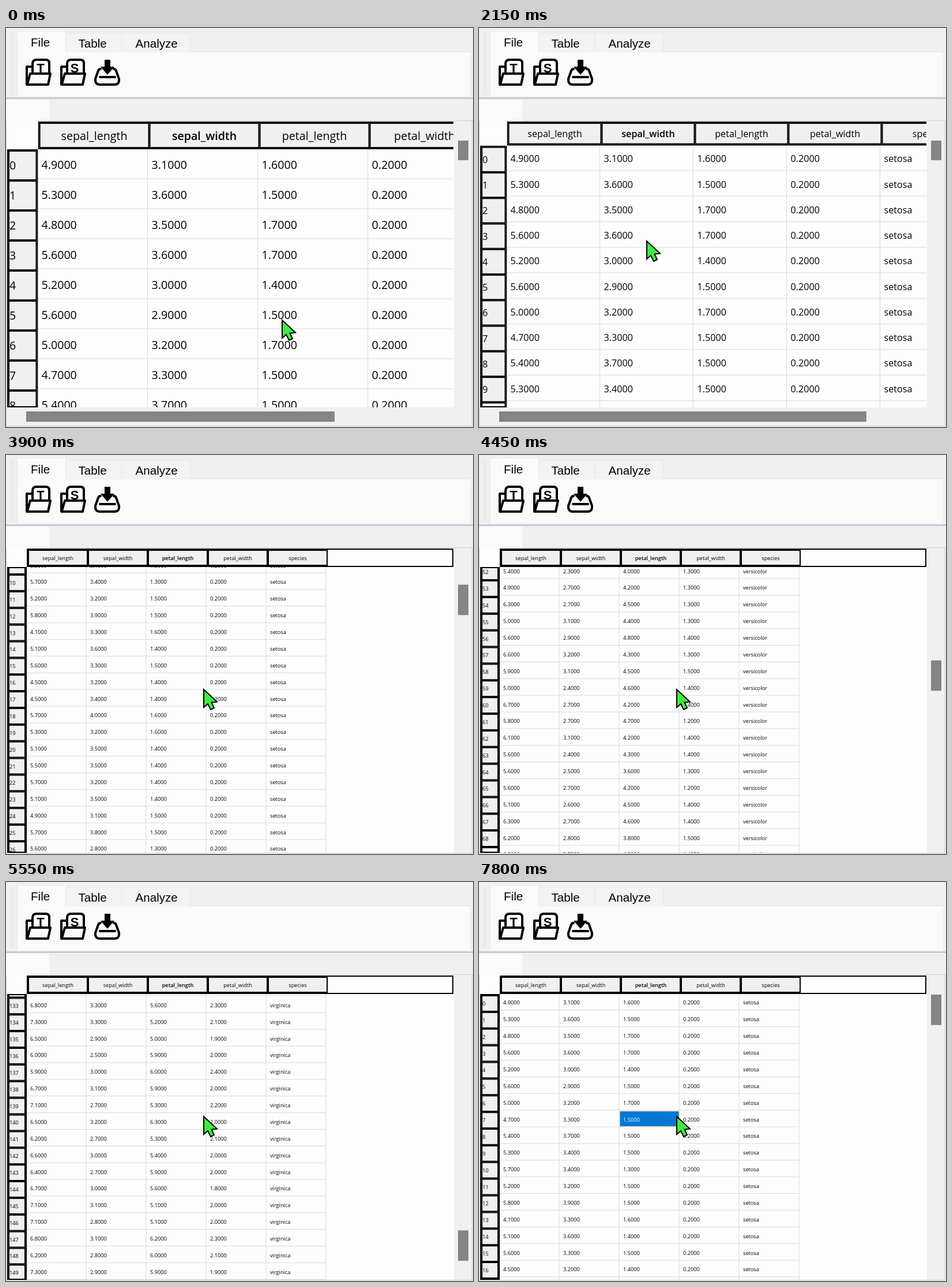
These frames come from a looping animation (810x691 px, 7850 ms). An HTML page:

```html
<!DOCTYPE html>
<html lang="en">
<head>
<meta charset="utf-8">
<title>Table viewer</title>
<style>
html, body { margin: 0; width: 100%; height: 100%; overflow: hidden; background: #f0f0f0; }
svg { display: block; }
.ui { font-family: "Liberation Sans", Arial, sans-serif; font-size: 20.6px; }
.data { font-family: "Open Sans", "Noto Sans", sans-serif; }
.icon { fill: none; stroke: #000; stroke-width: 4; stroke-linejoin: round; stroke-linecap: round; }
</style>
</head>
<body>
<svg width="810" height="691" viewBox="0 0 810 691">
  <defs>
    <g id="folder" class="icon">
      <path d="M46 76V62q0-7 7-7h16q6 0 6 6v15" fill="#fff"/>
      <path d="M45 67h-9v31h37l4-19H42l-5 18"/>
    </g>
  </defs>
  <rect width="810" height="691" fill="#f0f0f0"/>
  <path d="M8.500 8V115M11.500 10V115" stroke="#dcdce0" stroke-width="1.500" stroke-dasharray="2 2"/>
  <path d="M104 41V9H319V41M200.500 9V41M319 41H805" fill="#f3f3f3" stroke="#e5e5e8"/>
  <path d="M20 118V5H103V42H805V118Z" fill="#fafafa"/>
  <path d="M19.500 118V5.500H103.500V41" fill="none" stroke="#eaeaec"/>
  <g class="ui">
    <text x="43" y="31.500">File</text>
    <text x="125.500" y="33.500">Table</text>
    <text x="224.500" y="33.500">Analyze</text>
    <text x="24" y="151">iris</text>
  </g>
  <use href="#folder"/>
  <use href="#folder" x="60"/>
  <g font-family="Liberation Sans, Arial, sans-serif" font-size="22" font-weight="700" text-anchor="middle">
    <text x="60" y="77">T</text>
    <text x="119" y="77">S</text>
  </g>
  <path class="icon" d="M164 71q-3 0-4 3l-5 14q-1 10 8 10h25q9 0 8-10l-5-14q-1-3-4-3M163 85h26"/>
  <path d="M171 55h10v12h7l-12 14l-12-14h7Z"/>
  <path d="M0 121.500H810" stroke="#b8b8d0" stroke-width="2"/>
  <path d="M0 124H75V162H0Z" fill="#fafafa"/>
  <path d="M75 160.500H810" stroke="#cfcfcb"/>
  <g id="table" class="data"></g>
  <path d="M0 689.500H808.500V161M.5 161V690" fill="none" stroke="#c9c9c4"/>
  <path id="cursor" d="M0 0V31L7 25L12 35L18 32L13.500 22.500L23 21.500Z" fill="#40ec40" stroke="#000" stroke-width="2"/>
</svg>
<script>
const LOOP = 7850, STEP = 50, TOP = 162, RIGHT = 776, ROWS = 150;
const PAPER = "#fdfdfd", PANEL = "#f0f0f0", THUMB = "#858585";
const columns = ["sepal_length", "sepal_width", "petal_length", "petal_width", "species"];
const species = [
  { name: "setosa", means: [5, 3.4, 1.5, 0.2] },
  { name: "versicolor", means: [5.9, 2.8, 4.3, 1.3] },
  { name: "virginica", means: [6.6, 3, 5.6, 2] },
];

// Each flower scatters around the mean of its species.
let seed = 7;
const random = () => (seed = seed * 16807 % 2147483647) / 2147483647;
const cells = Array.from({ length: ROWS }, (_, i) => {
  const { name, means } = species[Math.floor(i / 50)];
  const scatter = m => m * (1 + 0.2 * (random() + random() - 1));
  return [...means.map(m => scatter(m).toFixed(1) + "000"), name];
});

// Moves are [start, end, new value]; between moves the value rests.
const zoomMoves = [[550, 1350, 18], [2100, 2400, 12], [2600, 2650, 11]];
const scrollMoves = [[3650, 4100, 500], [4200, 4600, 2115], [4700, 5150, 3831],
  [5250, 5550, 3836], [5750, 6100, 1562], [6250, 6500, 0]];
const cursorXMoves = [[1350, 1700, 290], [2600, 3050, 312], [3050, 3350, 342]];
const cursorYMoves = [[1350, 1700, 368], [2600, 3050, 400], [3050, 3350, 405]];

const follow = (value, moves, t) => moves.reduce((v, [start, end, to]) =>
  v + (to - v) * Math.min(1, Math.max(0, (t - start) / (end - start))), value);

const rect = (x, y, w, h, color) => `<rect x="${x}" y="${y}" width="${w}" height="${h}" fill="${color}"/>`;
const box = (x, y, w, h, color) =>
  `<rect x="${x + 1}" y="${y + 1}" width="${w - 2}" height="${h - 2}" fill="${color}" stroke="#000" stroke-width="2"/>`;
const line = (x1, y1, x2, y2) => `<path d="M${x1} ${y1}L${x2} ${y2}" stroke="#d9d9e4"/>`;
const label = (x, y, text, extra = "") => `<text x="${x}" y="${y}" ${extra}>${text}</text>`;
const pane = (x, y, w, h, content) =>
  `<svg x="${x}" y="${y}" width="${w}" height="${h}" viewBox="${x} ${y} ${w} ${h}">${content}</svg>`;

function drawTable(points, scroll, selected) {
  const k = points - 11;
  const left = 36 + k * (1.9 + 0.03 * k), head = 194 + k * (1.25 + 0.06 * k);
  const colW = 104 + 9.667 * k, rowH = 28.875 + 2.565 * k;
  const size = 9.2 + 1.16 * k, drop = size * 0.36;
  const wide = left + 5 * colW > RIGHT;
  const bottom = wide ? 657 : 689;
  const gridEnd = left + 5 * colW - 1;
  const colX = c => left + 2 + c * colW;
  let header = "", body = "", side = "";

  columns.forEach((name, c) => {
    const bold = c === selected.col ? 'font-weight="600"' : "";
    header += box(colX(c), TOP + 2, colW, head - TOP - 4, PANEL)
      + label(colX(c) + colW / 2, (TOP + head) / 2 + 0.7 + drop, name, `text-anchor="middle" ${bold}`);
    body += line(colX(c + 1) - 3, head, colX(c + 1) - 3, bottom);
  });

  const first = Math.floor(scroll / rowH);
  const last = Math.min(ROWS - 1, Math.ceil((scroll + bottom - head) / rowH));
  for (let r = first; r <= last; r++) {
    const y = head + r * rowH - scroll, base = y + rowH / 2 + 0.7 + drop;
    body += line(left, y + rowH - 1, gridEnd, y + rowH - 1);
    cells[r].forEach((text, c) => {
      const on = r === selected.row && c === selected.col;
      if (on) body += `<rect x="${colX(c) - 1.5}" y="${y + 1}" width="${colW - 2}" height="${rowH - 3}"
        fill="#0078d4" stroke="#e08a3c" stroke-dasharray="2 2"/>`;
      body += label(colX(c) + 4, base, text, on ? 'fill="#fff"' : "");
    });
    side += box(4, y + 2, left - 6, rowH, PANEL) + label(6, base + 1.5, r);
  }

  const view = bottom - head, content = ROWS * rowH;
  const trackH = wide ? 428 : 461;
  const thumbH = Math.max(34, trackH * view / content);
  const thumbY = 195 + (trackH - thumbH) * Math.min(1, scroll / (content - view));
  let out = rect(1, 161, 776, 528, PAPER)
    + pane(left, head, RIGHT - left, view, body)
    + pane(left, TOP, RIGHT - left, head - TOP,
        box(left, TOP, RIGHT - left, head - TOP, PAPER) + header)
    + pane(2, head, left - 2, view, side + box(2, head, left - 2, view, "none"))
    + rect(777, 161, 31, 528, PANEL)
    + rect(784, thumbY, 18, thumbH, THUMB);
  if (wide) {
    out += rect(1, 657, 807, 32, PANEL)
      + rect(35, 664, 713 * (RIGHT - left - 4) / (5 * colW), 18, THUMB);
  }
  return `<g font-size="${size}">${out}</g>`;
}

const table = document.getElementById("table");
const cursor = document.getElementById("cursor");
const start = performance.now();
let shown = -1;

function update() {
  const t = Math.floor((performance.now() - start) % LOOP / STEP) * STEP;
  if (t !== shown) {
    shown = t;
    const selected = t < 3500 ? { row: 11, col: 1 } : { row: 7, col: 2 };
    const zoom = Math.round(follow(20, zoomMoves, t));
    table.innerHTML = drawTable(zoom, follow(0, scrollMoves, t), selected);
    const x = follow(478, cursorXMoves, t) + 1, y = follow(505, cursorYMoves, t) + 1;
    cursor.setAttribute("transform", `translate(${x} ${y})`);
  }
  requestAnimationFrame(update);
}
update();
</script>
</body>
</html>
```
